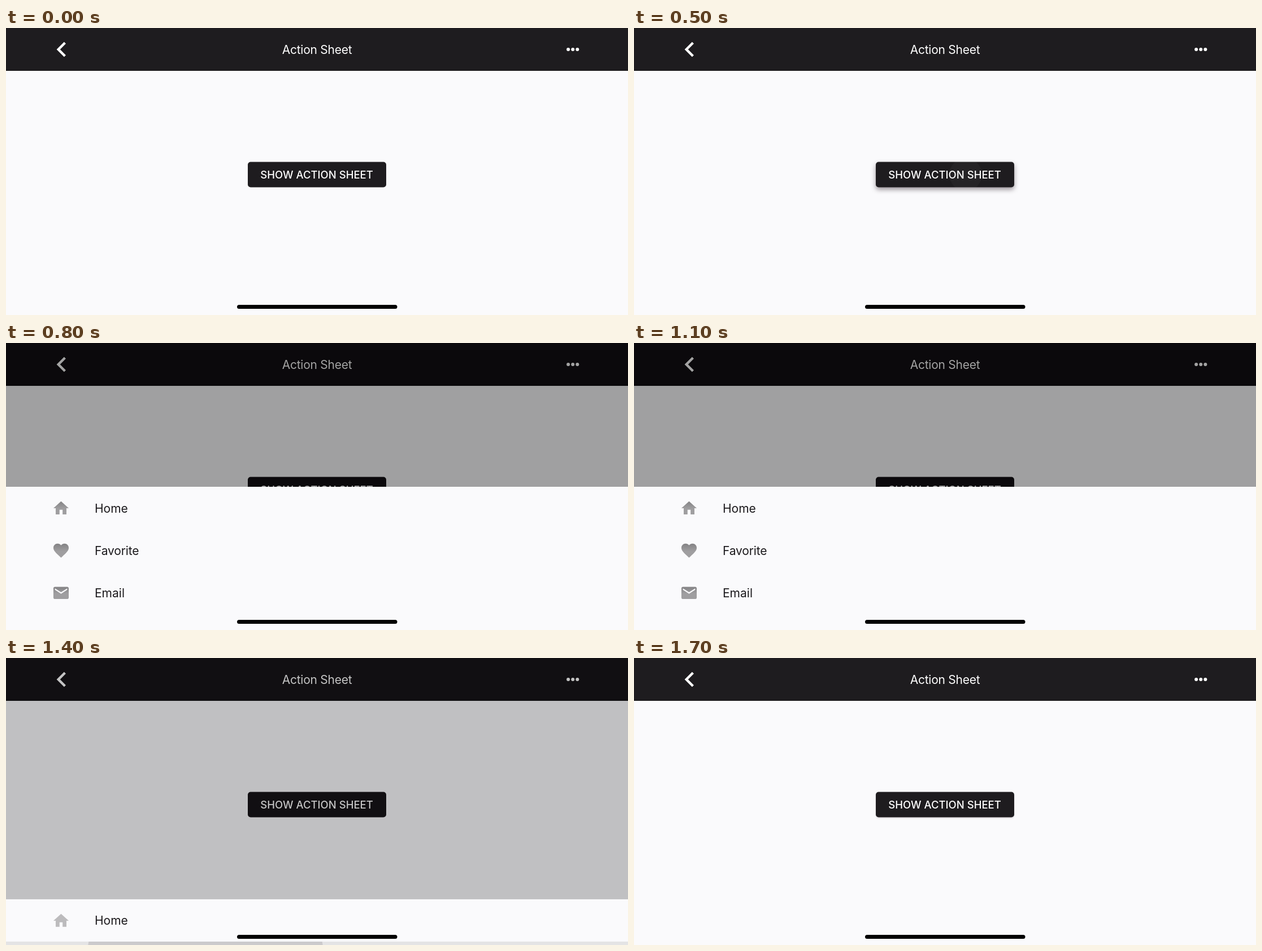
Animation of 1101 by 509 pixels, one loop 2000 ms. Source, as an HTML page:

```html
<!DOCTYPE html>
<html lang="en">
<head>
<meta charset="utf-8">
<title>Action Sheet</title>
<style>
  html, body { margin: 0; width: 100%; height: 100%; overflow: hidden; background: #fafafc; }
  svg { display: block; width: 1101px; height: 509px; }
  text { font: 21px Inter, "Liberation Sans", sans-serif; fill: #1a181b; }
  .light { fill: #fff; }
  .mid { text-anchor: middle; }
</style>
</head>
<body>
<svg viewBox="0 0 1101 509">
  <defs>
    <linearGradient id="grey" x2="0" y2="1">
      <stop stop-color="#838284"/>
      <stop offset=".55" stop-color="#9f9ea0"/>
    </linearGradient>
    <clipPath id="buttonClip"><rect x="428" y="237.5" width="245" height="45" rx="5"/></clipPath>
    <clipPath id="rowClip"><rect y="330" width="1101" height="75"/></clipPath>
  </defs>

  <rect width="1101" height="509" fill="#fafafc"/>
  <rect class="ink" width="1101" height="76"/>
  <path d="M104.4 26.3L92.7 38l11.7 11.7" fill="none" stroke="#fff" stroke-width="4.4"/>
  <text class="light mid" x="550.5" y="45.6" letter-spacing="-.25">Action Sheet</text>
  <g class="light">
    <circle cx="995.2" cy="38" r="3"/><circle cx="1003.3" cy="38" r="3"/><circle cx="1011.4" cy="38" r="3"/>
  </g>

  <rect id="button" class="ink" x="428" y="237.5" width="245" height="45" rx="5"/>
  <circle id="tap" cx="587" cy="260" fill="#fff" opacity=".03" clip-path="url(#buttonClip)"/>
  <text class="light mid" x="550" y="266.6" style="font-size:18.5px;font-weight:500">SHOW ACTION SHEET</text>

  <rect id="dim" width="1101" height="509"/>

  <g id="sheet">
    <rect y="255" width="1101" height="254" fill="#fafafc"/>
    <rect id="row" y="330" width="1101" height="75"/>
    <circle id="rowTap" cx="353" cy="367.5" r="210" fill="#cbcacc" clip-path="url(#rowClip)"/>
    <path id="home" transform="translate(81.2 276.8) scale(1.356)" d="M10 20v-6h4v6h5v-8h3L12 3 2 12h3v8z"/>
    <path id="heart" transform="translate(81.2 351.8) scale(1.356)" d="M12 21.35l-1.45-1.32C5.4 15.36 2 12.28 2 8.5 2 5.42 4.42 3 7.5 3c1.74 0 3.41.81 4.5 2.09C13.09 3.81 14.76 3 16.5 3 19.58 3 22 5.42 22 8.5c0 3.78-3.4 6.86-8.55 11.54z"/>
    <path fill="url(#grey)" transform="translate(81.2 427) scale(1.356)" d="M20 4H4c-1.1 0-2 .9-2 2v12c0 1.1.9 2 2 2h16c1.1 0 2-.9 2-2V6c0-1.1-.9-2-2-2zm0 4l-8 5-8-5V6l8 5 8-5z"/>
    <text x="157" y="300.5">Home</text>
    <text x="157" y="375.6" letter-spacing="-.15">Favorite</text>
    <text x="157" y="450.6">Email</text>
  </g>

  <rect x="409" y="491" width="283.5" height="7" rx="3.5"/>
</svg>
<script>
const $ = id => document.getElementById(id);
const inks = document.querySelectorAll('.ink');
const clamp = v => Math.min(1, Math.max(0, v));
const mix = (a, b, k) => a + (b - a) * k;
const show = (id, on) => $(id).setAttribute('visibility', on ? 'visible' : 'hidden');

function draw(t) {
  const closing = t >= 1400;
  const left = closing ? 1 - clamp((t - 1313) / 200) : 1 - clamp((t - 560) / 240);
  const shown = closing ? left ** 2 : 1 - left ** 2;
  const shade = closing ? left ** .78 : 1 - left ** 1.5;

  $('sheet').setAttribute('transform', `translate(0 ${254 * (1 - shown)})`);
  show('sheet', shown > 0);
  $('dim').setAttribute('opacity', .36 * shade);
  const ink = [[30, 17], [28, 14], [31, 18]].map(([a, b]) => mix(a, b, shade));
  inks.forEach(e => e.setAttribute('fill', `rgb(${ink})`));

  const pressed = t >= 500 && t < 700;
  show('tap', pressed);
  $('tap').setAttribute('r', 29 + (t - 500) * .5 * pressed);
  $('button').style.filter = pressed ? 'drop-shadow(0 4px 4px rgba(35,20,30,.45))'
    : t >= 1700 ? 'drop-shadow(0 2px 1px rgba(60,30,50,.13))' : 'none';

  const held = t >= 1300;
  show('row', t >= 1200 && shown > 0);
  $('row').setAttribute('fill', closing ? '#e4e4e5' : held ? '#dadadb' : '#ebebec');
  show('rowTap', closing && shown > 0);
  $('heart').setAttribute('fill', held ? '#69686a' : 'url(#grey)');
  $('home').setAttribute('fill', closing ? '#bcbbbd' : 'url(#grey)');
}

// The picture advances in steps of 100 ms over a 2 s loop.
const start = performance.now();
function tick() {
  draw(Math.floor((performance.now() - start) % 2000 / 100) * 100);
  requestAnimationFrame(tick);
}
tick();
</script>
</body>
</html>
```
